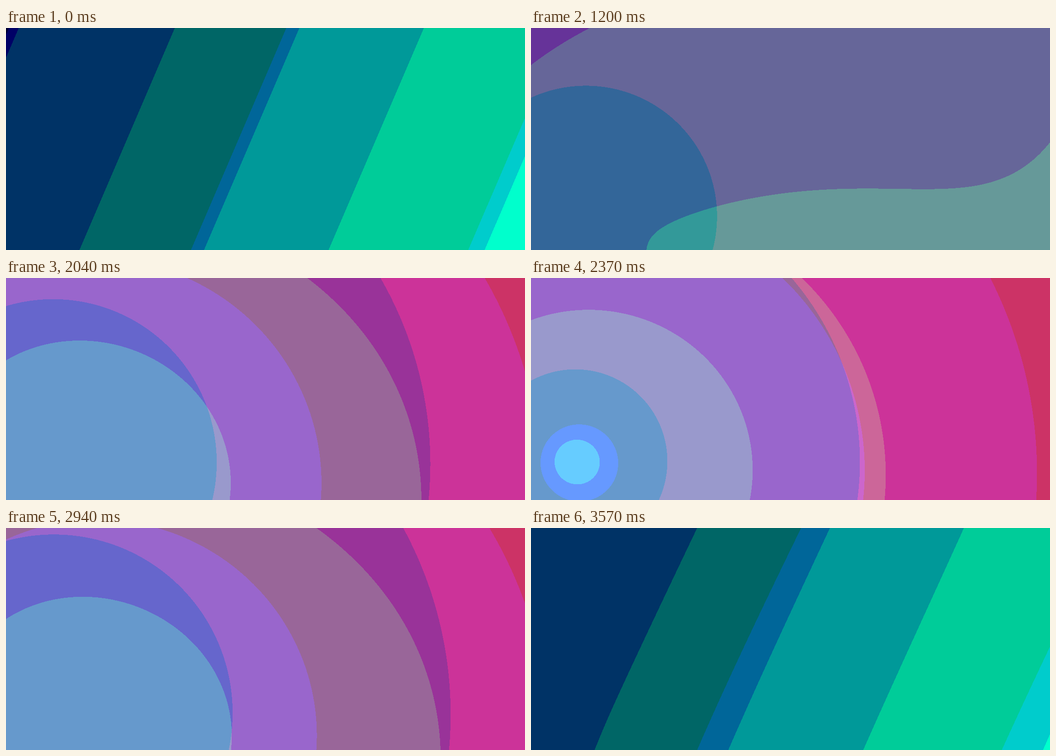
Recreate the animation shown at these times as an HTML page with a canvas. Size 1143 by 490 pixels, loop 3600 ms.

```html
<!DOCTYPE html>
<html lang="en">
<head>
<meta charset="utf-8">
<title>Gradient crossfade</title>
<style>
  html, body { margin: 0; width: 100%; height: 100%; overflow: hidden; background: #036; }
  canvas { display: block; width: 1143px; height: 490px; }
</style>
</head>
<body>
<canvas id="stage" width="1143" height="490"></canvas>
<script>
const W = 1143, H = 490;
const LOOP = 3600, RISE = 2700, STEP = 30;
const CX = 95, CY = 403;
const REACH = Math.hypot(W - CX, CY);
const LEVEL = 51;

// Red, green and blue along the diagonal, u from 0 to 1
const diagonal = [
  u => 17 - 13 * u,
  u => 127.5 * (1 + Math.sin(2.03 * (u - 0.477))),
  u => 76 + 113 * u
];

// Red, green and blue outward from the centre, t from 0 to 1
const radial = [
  t => Math.min(255, 118 + 134.8 * t + 27.7 * t * t),
  t => 204 * (1 - t) * (1 - t ** 3),
  t => 255 - 92 * t - 63 * t * t
];

const ctx = document.getElementById('stage').getContext('2d');
const image = ctx.createImageData(W, H);
const pixels = new Uint32Array(image.data.buffer);

// Start level and change per channel, offset by half a level for rounding
const base = diagonal.map(() => new Float32Array(W * H));
const delta = radial.map(() => new Float32Array(W * H));
for (let y = 0, i = 0; y < H; y++) {
  for (let x = 0; x < W; x++, i++) {
    const u = (x * W + y * H) / (W * W + H * H);
    const t = Math.hypot(x - CX, y - CY) / REACH;
    for (let c = 0; c < 3; c++) {
      const from = diagonal[c](u);
      base[c][i] = from / LEVEL + 0.5;
      delta[c][i] = (radial[c](t) - from) / LEVEL;
    }
  }
}

function draw(mix) {
  const [r0, g0, b0] = base, [r1, g1, b1] = delta;
  for (let i = 0; i < pixels.length; i++) {
    const r = (r0[i] + r1[i] * mix) | 0;
    const g = (g0[i] + g1[i] * mix) | 0;
    const b = (b0[i] + b1[i] * mix) | 0;
    pixels[i] = 0xff000000 + LEVEL * (r | g << 8 | b << 16);
  }
  ctx.putImageData(image, 0, 0);
}

const start = performance.now();
let shown = -1;

function tick() {
  const elapsed = (performance.now() - start) % LOOP;
  const time = Math.floor(elapsed / STEP) * STEP;
  if (time !== shown) {
    shown = time;
    draw(time < RISE ? time / RISE : (LOOP - time) / (LOOP - RISE));
  }
  requestAnimationFrame(tick);
}
tick();
</script>
</body>
</html>
```
